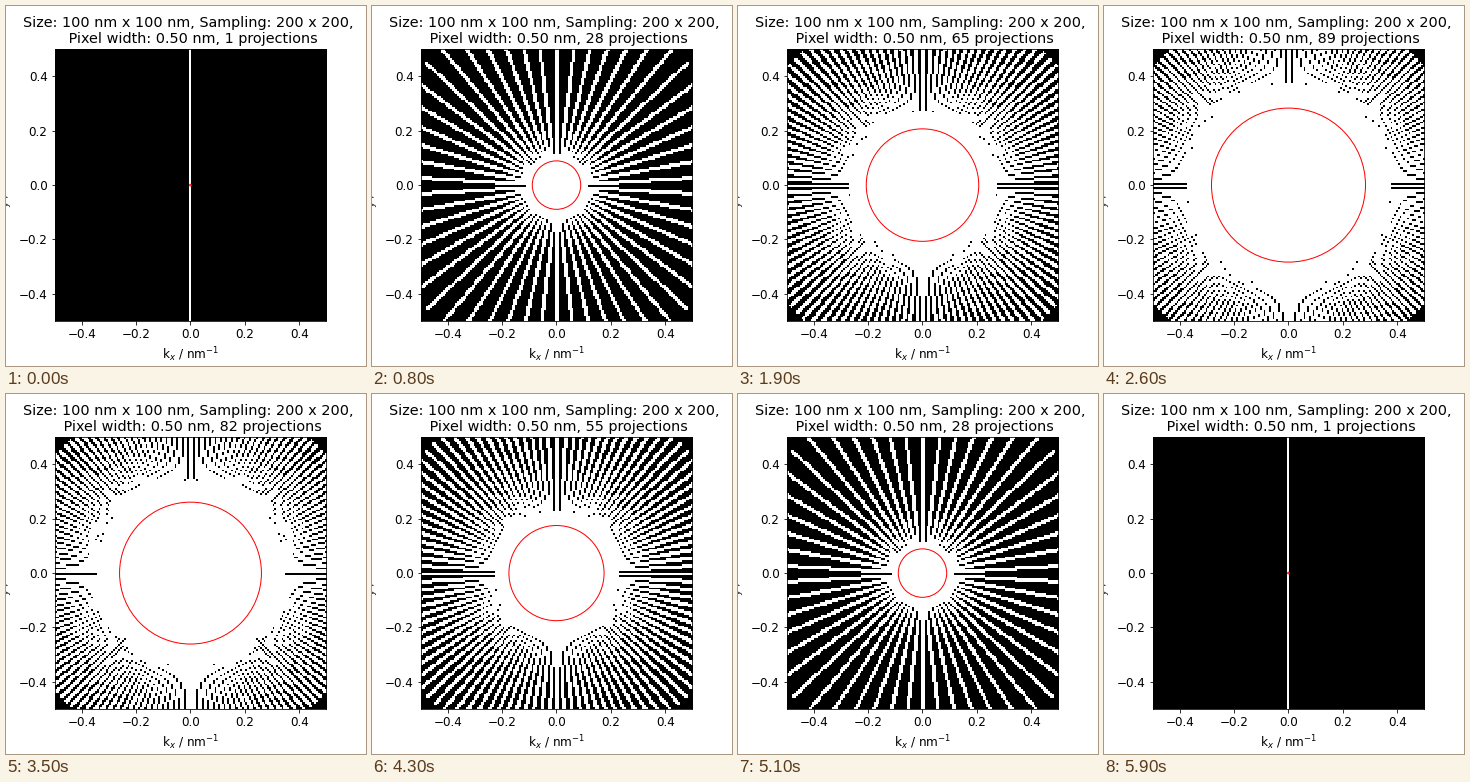
These frames come from a looping animation (360x360 px, 6000 ms). A matplotlib script:

```python
import numpy as np
import matplotlib.pyplot as plt
from matplotlib.animation import FuncAnimation
from matplotlib.patches import Circle

plt.rcParams.update({
    "font.family": "DejaVu Sans",
    "font.size": 12,
    "figure.subplot.left": 0.125,
    "figure.subplot.right": 0.9,
    "figure.subplot.bottom": 0.125,
    "figure.subplot.top": 0.88,
})

SIZE = 100          # object size in nm
SAMPLES = 200       # samples per side
VIEW = 150          # visible central part of the grid
MAX_PROJECTIONS = 100

rise = np.linspace(1, MAX_PROJECTIONS, 30).astype(int)
counts = np.concatenate([rise, rise[::-1]])

# Cell centres relative to the rotation centre, y pointing up
axis = np.arange(VIEW) - (VIEW - 1) / 2
gx, gy = np.meshgrid(axis, axis)


def coverage(n):
    """Cells touched by n one-cell-wide lines spread over 180 degrees."""
    covered = np.zeros((VIEW, VIEW), bool)
    for t in np.radians(np.linspace(0, 180, n)):
        across = gx * np.cos(t) + gy * np.sin(t) + 0.5
        along = gy * np.cos(t) - gx * np.sin(t)
        covered |= (np.abs(across) < 1 - 1e-6) & (np.abs(along) <= SAMPLES / 2 - 0.5)
    return covered.astype(float)


def heading(n):
    return (f"Size: {SIZE} nm x {SIZE} nm, Sampling: {SAMPLES} x {SAMPLES}, \n"
            f" Pixel width: {SIZE / SAMPLES:.2f} nm, {n} projections")


fig, ax = plt.subplots(figsize=(5, 5), dpi=72)
image = ax.imshow(coverage(1), cmap="gray", vmin=0, vmax=1, origin="lower",
                  extent=(-0.5, 0.5, -0.5, 0.5), interpolation="nearest")
ring = ax.add_patch(Circle((0, 0), 0.01, fill=False, edgecolor="red", linewidth=1))
title = ax.set_title(heading(1))
ax.set_xlabel("k$_x$ / nm$^{-1}$")
ax.set_ylabel("k$_y$ / nm$^{-1}$")


def update(i):
    n = counts[i]
    image.set_data(coverage(n))
    ring.set_radius(n / (np.pi * SIZE))   # resolution limit for n projections
    title.set_text(heading(n))
    return image, ring, title


anim = FuncAnimation(fig, update, frames=len(counts), interval=100,
                     repeat=True, repeat_delay=0, blit=False)
plt.show()
```
